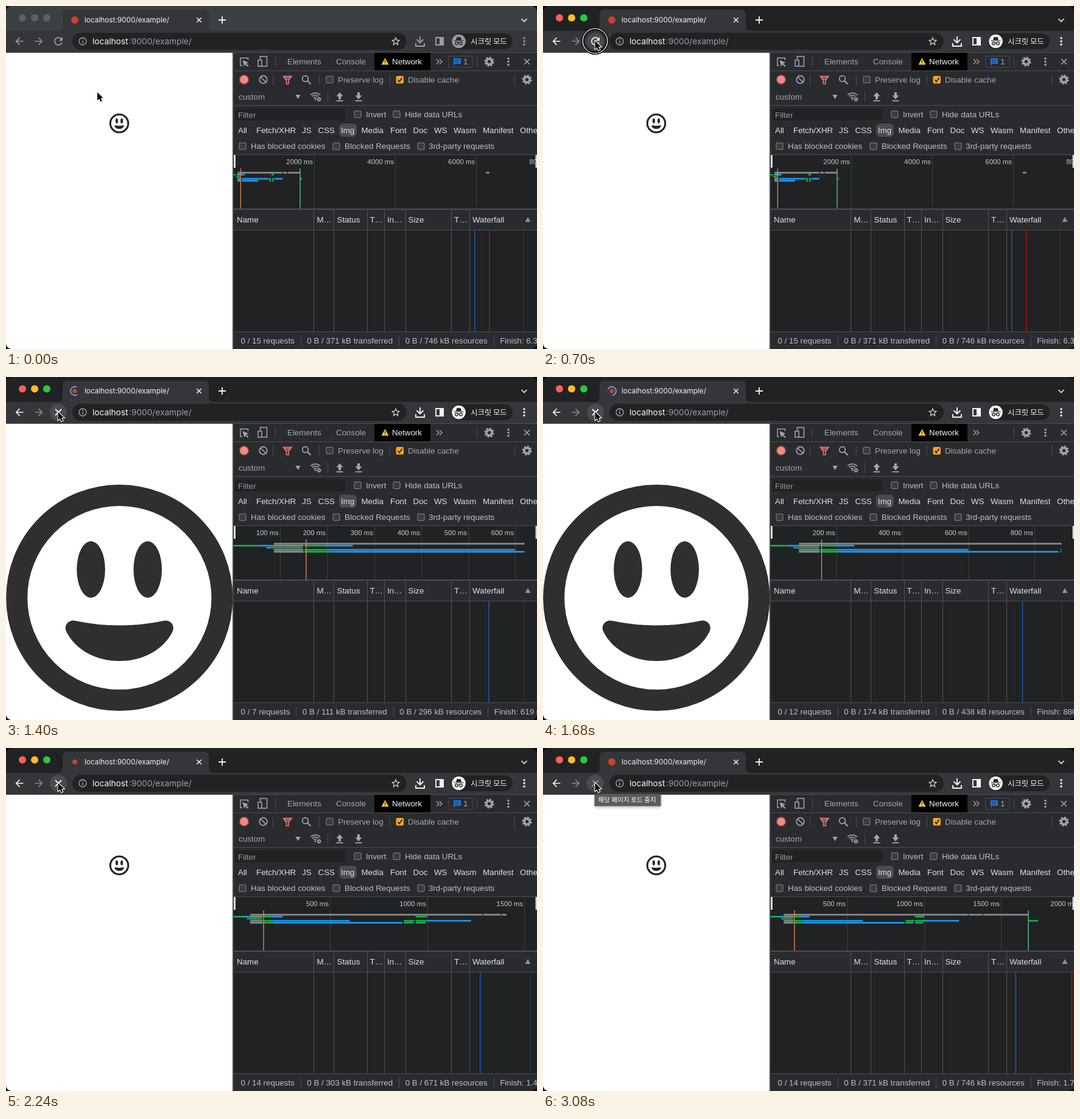
These frames come from a looping animation (872x564 px, 3360 ms). An HTML page with a canvas:

```html
<!DOCTYPE html>
<html lang="ko">
<head>
<meta charset="utf-8">
<title>Page reload</title>
<style>
html, body { margin: 0; width: 100%; height: 100%; overflow: hidden; background: #000; }
canvas { display: block; }
</style>
</head>
<body>
<canvas id="stage" width="872" height="564"></canvas>
<script>
const ctx = document.getElementById('stage').getContext('2d');
const LOOP = 3360, STEP = 70, LEFT = 373.5, WIDTH = 498;
const SANS = '"Liberation Sans", Arial, sans-serif';
const UI = 'Inter, sans-serif';
const KOREAN = '"Noto Sans CJK KR", "Noto Sans CJK", sans-serif';
const BAR = '#292b2e', BODY = '#202224', EDGE = '#4b4d51', DIM = '#a3a8ad', SOFT = '#bcc0c4', LIGHT = '#dfe1e5';

// ---- drawing helpers
function rect(x, y, w, h, c, r = 0) {
  ctx.fillStyle = c;
  ctx.beginPath();
  ctx.roundRect(x, y, w, h, r);
  ctx.fill();
}
function dot(x, y, r, c) {
  ctx.fillStyle = c;
  ctx.beginPath();
  ctx.arc(x, y, r, 0, 7);
  ctx.fill();
}
function ring(x, y, r, c, w = 1.5, from = 0, to = 2 * Math.PI) {
  ctx.strokeStyle = c;
  ctx.lineWidth = w;
  ctx.beginPath();
  ctx.arc(x, y, r, from, to);
  ctx.stroke();
}
function fill(d, c) {
  ctx.fillStyle = c;
  ctx.fill(new Path2D(d));
}
function line(d, c, w = 1.5) {
  ctx.strokeStyle = c;
  ctx.lineWidth = w;
  ctx.stroke(new Path2D(d));
}
function moved(x, y, scale, draw) {
  ctx.save();
  ctx.translate(x, y);
  ctx.scale(scale, scale);
  draw();
  ctx.restore();
}
// path on a 24 px grid, centred on x, y
function icon(d, x, y, scale, c) {
  moved(x, y, scale, () => { ctx.translate(-12, -12); fill(d, c); });
}
function text(s, x, y, c = SOFT, size = 13.35, font = SANS, weight = 400) {
  ctx.font = `${weight} ${size}px ${font}`;
  ctx.fillStyle = c;
  ctx.fillText(s, x, y);
}
const cross = (x, y, r, c, w) => line(`M${x - r} ${y - r}l${2 * r} ${2 * r}m0 ${-2 * r}l${-2 * r} ${2 * r}`, c, w);
const vline = (x, y, h, c = EDGE, w = 1) => rect(x, y, w, h, c);
const kebab = (x, y, c, gap) => [-gap, 0, gap].forEach(d => dot(x, y + d, 1.7, c));
const checkbox = (x, y) => {
  rect(x, y, 12, 12, '#85888c', 2.5);
  rect(x + 1, y + 1, 10, 10, '#3b3b3d', 1.5);
};
function gear(x, y, c, s = 1) {
  ring(x, y, 4.4 * s, c, 3.2 * s);
  ctx.setLineDash([3.2 * s, 2.06 * s]);
  ring(x, y, 6.7 * s, c, 2.6 * s);
  ctx.setLineDash([]);
}

const ICON = {
  back: 'M20 11H7.83l5.59-5.59L12 4l-8 8 8 8 1.41-1.41L7.83 13H20z',
  forward: 'M12 4l-1.41 1.41L16.17 11H4v2h12.17l-5.58 5.59L12 20l8-8z',
  reload: 'M17.65 6.35C16.2 4.9 14.21 4 12 4c-4.42 0-8 3.58-8 8s3.58 8 8 8c3.73 0 6.84-2.55 7.73-6h-2.08c-.82 2.33-3.04 4-5.65 4-3.31 0-6-2.69-6-6s2.69-6 6-6c1.66 0 3.14.69 4.22 1.78L13 11h7V4z',
  star: 'M22 9.24l-7.19-.62L12 2 9.19 8.63 2 9.24l5.46 4.73L5.82 21 12 17.27 18.18 21l-1.63-7.03zM12 15.4l-3.76 2.27 1-4.28-3.32-2.88 4.38-.38L12 6.1l1.71 4.04 4.38.38-3.32 2.88 1 4.28z',
};

// ---- network data: [row, start ms, colour of each part, end ms of each part]
const COLORS = { g: '#16ad47', b: '#1c95ec', x: '#8b8b8b' };
const OLD_BARS = [
  [0, 98, 'x', 1205], [0, 1225, 'x', 1320], [0, 1340, 'x', 1647], [0, 6230, 'x', 6320],
  [1, 0, 'g', 50], [1, 75, 'gxb', 110, 188, 278], [1, 940, 'g', 1000], [2, 68, 'g', 158],
  [3, 98, 'x', 188], [3, 210, 'b', 870], [3, 880, 'g', 930], [3, 955, 'g', 1000],
  [3, 1015, 'b', 1210], [3, 1650, 'g', 1690],
  [4, 98, 'x', 188], [4, 205, 'b', 609], [4, 880, 'g', 925], [4, 955, 'g', 995],
];
const BARS = [
  [0, 86, 'x', 1282], [0, 1286, 'x', 1377], [0, 1381, 'x', 1670],
  [1, 0, 'gbx', 52, 86, 149], [1, 151, 'gb', 195, 254], [1, 938, 'g', 998],
  [2, 70, 'bg', 77, 147],
  [3, 86, 'x', 149], [3, 151, 'gb', 201, 599], [3, 877, 'g', 932], [3, 938, 'gb', 998, 1224], [3, 1674, 'g', 1737],
  [4, 86, 'x', 149], [4, 151, 'gb', 209, 871], [4, 877, 'g', 928], [4, 938, 'g', 990],
];
const OLD = { now: 6320, span: 7489, grid: 7489, blue: 769, gray: 849, kb: 371, res: 746,
  dom: 173, load: 1640, red: 793, requests: 15, bars: OLD_BARS };
// time, elapsed, bar span, ruler span, DOM marker x, guide x, kB moved, kB in all
const KEYS = [
  [770, 0, 70, 70, 862, 800, 0, 0],
  [1050, 284, 329, 263, 823, 839, 27, 81.6],
  [1400, 619, 645, 645, 792, 850, 111, 296],
  [2030, 1207, 1257, 1257, 780, 854, 252, 615],
  [2520, 1672, 1968, 1968, 775.5, 871, 370, 746],
  [2590, 1740, 1968, 1968, 775.5, 871, 371, 746],
];
function network(t) {
  if (t < 770) return OLD;
  const i = Math.max(1, KEYS.findIndex(k => k[0] >= t));
  const last = t > 2590;
  const a = KEYS[last ? 5 : i - 1], b = KEYS[last ? 5 : i];
  const p = last ? 0 : (t - a[0]) / (b[0] - a[0]);
  const [, now, span, grid, blue, gray, kb, res] = a.map((v, n) => v + (b[n] - v) * p);
  const requests = now < 52 ? 1 : now < 86 ? 3 : now < 870 ? 7 : now < 1240 ? 12 : 14;
  return { now, span, grid, blue, gray, kb, res, dom: 154, load: 1672, red: 867.5, requests, bars: BARS };
}

// ---- parts of the picture
function browser(t, active) {
  const on = active ? '#f1f3f4' : '#9a9c9f', off = active ? '#85888c' : '#8b8d90';
  rect(0, 0, 872, 42, active ? BODY : '#3c4043');
  rect(0, 41, 872, 36, '#35363a');
  fill('M85 41Q93 41 93 33V14Q93 6 101 6H325Q333 6 333 14V33Q333 41 341 41Z', '#35363a');
  ['#ff5f57', '#febc2e', '#28c840'].forEach((c, i) => dot(27 + 20 * i, 19.6, 6, active ? c : '#5d5f62'));

  const waiting = t >= 840 && t < 1980;
  dot(113, 23, waiting ? 3.5 : t >= 1980 && t < 2380 ? 4 : t >= 2380 && t < 2600 ? 5 : 6, '#cf3f2c');
  if (waiting) {
    const turn = (t - 1400) * .009;
    ring(113, 23, 7, t < 1120 ? '#7f8c9a' : '#6fa5e2', 1.8, 1 + turn, 5.2 + turn);
  }
  text('localhost:9000/example/', 129, 27, '#f1f3f4', 11.8, UI);
  cross(317, 23, 3.8, '#e8eaed', 1.6);
  line('M349 23h12m-6-6v12', '#f1f3f4', 1.8);
  line('M846.5 21l4.5 4.5 4.5-4.5', '#e8eaed', 1.7);

  icon(ICON.back, 22, 58, .8, on);
  icon(ICON.forward, 54, 58, .8, off);
  if (active) dot(86, 58, 14, '#4a4b4f');
  if (t < 1120) icon(ICON.reload, 86, 58, .86, on);
  else cross(86, 58, 5, t < 2450 ? '#f1f3f4' : '#85888c', 1.8);

  rect(109, 44, 549, 28, BODY, 14);
  ring(126, 58, 6, '#a4a8ac', 1.3);
  line('M126 57v4.5M126 54.2v1.6', '#a4a8ac', 1.5);
  text('localhost', 142, 63, '#f8f9fa', 13.7, UI);
  text(':9000/example/', 202, 63, '#9aa0a6', 13.7, UI);
  icon(ICON.star, 640, 58, .74, '#d6d8db');
  line('M680 50v10M674.5 55l5.5 5.5 5.5-5.5M673 61v5h14v-5', on, 1.9);
  line('M706 52h12v12h-12z', on, 1.9);
  rect(712, 51, 7, 14, on);
  rect(731, 45, 101, 26, BODY, 13);
  dot(743.5, 58, 11.3, on);
  fill('M739 56l1.3-4.5q.3-1 1.3-.6l1.9.5 1.9-.5q1-.4 1.3.6l1.3 4.5zM735.5 56.4h16v1.2h-16z', BODY);
  ring(740, 61.5, 2.3, BODY, 1.3);
  ring(747, 61.5, 2.3, BODY, 1.3);
  line('M742 61q1.5-.8 3 0', BODY, 1.1);
  text('시크릿 모드', 763, 62.5, '#f1f3f4', 12.4, KOREAN, active ? 500 : 400);
  kebab(851, 58, on, 5.3);
  rect(0, 76, 872, 1, '#4c4d50');
}

function face(big) {
  rect(0, 77, 372, 487, '#fff');
  moved(big ? 186.3 : 186, big ? 363 : 193, big ? 1 : .0875, () => {
    const c = big ? '#312e2f' : '#262324';
    ring(0, 0, 168.6, c, 35);
    ctx.beginPath();
    for (const x of [-46.8, 46.4]) ctx.ellipse(x, -46.5, 23.3, 46.5, 0, 0, 7);
    ctx.fillStyle = c;
    ctx.fill();
    fill('M-72 38Q0 53 72 38C84 35 92 46 87 56C72 86 38 104 0 104C-38 104-72 86-87 56C-92 46-84 35-72 38Z', c);
  });
}

function toolbars(badge) {
  rect(372, 77, 2, 487, '#46484b');
  rect(374, 77, 498, 487, BAR);
  // panel tabs
  line('M388 98h-3v-12.5h12.5v3.5', DIM, 1.4);
  fill('M388.5 89l10 4-4 1.6 4 4-1.5 1.5-4-4-1.6 3.6z', DIM);
  line('M417.5 88v-5h11v16h-8M414 89h6v10h-6z', DIM, 1.5);
  vline(442, 83, 17);
  text('Elements', 462, 96, DIM);
  text('Console', 542, 96, DIM);
  rect(605, 77, 92, 29, '#000');
  fill('M622.5 85.5l6 11h-12z', '#fcc934');
  line('M622.5 89v4M622.5 94v1.3', '#3a3000', 1.3);
  text('Network', 634, 96, '#f4f4f4');
  line('M707 87.5l4 4-4 4m5-8l4 4-4 4', DIM, 1.3);
  if (badge) {
    rect(726.5, 82, 40, 19.5, EDGE, 2);
    rect(727.5, 83, 38, 17.5, BAR, 1.5);
    fill('M735 86h12v9h-9l-3 3z', '#1a73e8');
    line('M737 89h8m-8 3h6', BAR, 1);
    text('1', 751, 96, DIM);
  }
  vline(773, 83, 17);
  gear(793.5, 91.5, DIM);
  kebab(825, 91.5, DIM, 5);
  cross(855.5, 91.5, 4.5, DIM, 1.6);
  rect(374, 106, 498, 1, EDGE);

  // recording controls
  dot(391, 121, 8.5, '#6b3b3a');
  dot(391, 121, 6.8, '#f28b82');
  ring(422.5, 121, 6.3, DIM, 1.7);
  line('M418 116.5l9 9', DIM, 1.7);
  vline(438, 113, 17);
  line('M455.5 115.5h13.5l-5 6.5v6h-3.5v-6z', '#f07b72', 1.6);
  line('M457 117.5h10l-2 3h-6z', '#f07b72', 1.5);
  ring(491.5, 119.5, 4.8, DIM, 1.7);
  line('M495 123l5.5 5.5', DIM, 2);
  vline(514, 113, 17);
  checkbox(525.5, 115);
  text('Preserve log', 545, 126, DIM);
  vline(630, 113, 17);
  rect(640.5, 115, 12.5, 12.5, '#fca326', 2.5);
  line('M643.5 121.5l2.5 3 4.5-6.5', '#202124', 1.9);
  text('Disable cache', 660, 126, DIM);
  vline(835, 113, 17);
  gear(855.5, 121, DIM);

  text('custom', 382, 154, DIM);
  fill('M475.5 146h8l-4 7z', DIM);
  for (const r of [4, 7.5, 11]) ring(508, 154, r, DIM, 1.6, -2.35, -.75);
  dot(508, 153, 1.5, DIM);
  dot(514, 153.5, 4.6, BAR);
  gear(514, 153.5, DIM, .45);
  vline(528, 141, 17);
  fill('M548 142l5.5 6.5h-3.5v5h-4v-5h-3.5z', DIM);
  fill('M579 153.5l5.5-6.5h-3.5v-5h-4v5h-3.5z', DIM);
  rect(542.5, 155, 11, 1.8, DIM);
  rect(573.5, 155, 11, 1.8, DIM);
  rect(374, 163, 498, 1, EDGE);

  // filters
  rect(376, 168, 181, 20, BODY);
  text('Filter', 381, 184, '#96999d');
  checkbox(571.5, 172);
  text('Invert', 591, 183);
  checkbox(635.5, 172);
  text('Hide data URLs', 655, 183);
  rect(547, 193.5, 29, 21.5, '#4a4b4e', 6);
  const types = { All: 381, 'Fetch/XHR': 411, JS: 486, CSS: 512.5, Img: 550, Media: 583.5, Font: 631,
    Doc: 668.5, WS: 703, Wasm: 735, Manifest: 783, Other: 844 };
  for (const name in types) text(name, types[name], 209, LIGHT);
  checkbox(382.5, 224.5);
  text('Has blocked cookies', 402, 235);
  checkbox(536.5, 224.5);
  text('Blocked Requests', 556, 235);
  checkbox(675.5, 224.5);
  text('3rd-party requests', 694, 235);
  rect(374, 244, 498, 1, EDGE);
}

function overview(net) {
  rect(374, 245, 498, 88, BODY);
  const gridScale = WIDTH / net.grid, scale = WIDTH / net.span;
  let step = 1;
  for (let i = 0; step * gridScale < 70; i++) step *= [2, 2.5, 2][i % 3];
  ctx.textAlign = 'right';
  for (let ms = step; ms < net.grid + step; ms += step) {
    const x = Math.round(LEFT + ms * gridScale - .6);
    vline(x, 245, 88, '#3b3d40');
    text(ms + ' ms', x - 2, 260, '#c6c9cd', 11.4);
  }
  ctx.textAlign = 'left';
  for (const [row, start, kinds, ...ends] of net.bars) {
    let from = start;
    ends.forEach((end, i) => {
      const to = Math.min(end, net.now);
      if (to > from) rect(LEFT + from * scale, 272.7 + 3.35 * row, (to - from) * scale, 2.7, COLORS[kinds[i]]);
      from = end;
    });
  }
  if (net.now >= net.dom) vline(LEFT + net.dom * scale - .3, 267, 66, '#df8250', 1.4);
  if (net.now >= net.load) vline(LEFT + net.load * scale - .3, 267, 66, '#4fbf98', 1.4);
  vline(374, 245, 21, '#d5d7da', 3);
  vline(869.5, 245, 21, '#d5d7da', 3);
}

function table(net) {
  rect(374, 333, 498, 2, EDGE);
  rect(374, 335, 498, 33, BAR);
  rect(374, 368, 498, 167, BODY);
  rect(374, 368, 498, 1, EDGE);
  vline(Math.round(net.gray), 369, 166, '#35373a');
  for (const x of [505, 538, 593, 621, 656, 731, 761]) vline(x, 335, 200, '#505256');
  const heads = [['Name', 379], ['M…', 510.5], ['Status', 543.5], ['T…', 597.5], ['In…', 626], ['Size', 660.5],
    ['T…', 736], ['Waterfall', 766]];
  for (const [name, x] of heads) text(name, x, 356, LIGHT);
  fill('M857 347l4.5 8h-9z', '#8e9195');
  if (net.now >= net.dom) vline(net.blue, 369, 166, '#1a56a4', 1.6);
  if (net.now >= net.load + 60) vline(net.red, 369, 166, '#9c1712', 1.6);

  rect(374, 535, 498, 1, EDGE);
  rect(374, 536, 498, 28, BAR);
  const size = v => (v < 100 ? v.toFixed(1) : Math.round(v)) + ' kB';
  const finish = net.now < 1000 ? Math.round(net.now) + ' ms' : (net.now / 1000).toFixed(2) + ' s';
  const parts = [`0 / ${net.requests} requests`, `0 B / ${size(net.kb)} transferred`,
    `0 B / ${size(net.res)} resources`, 'Finish: ' + finish];
  let x = 385.5;
  parts.forEach((part, i) => {
    text(part, x, 555);
    x += ctx.measureText(part).width + 10;
    if (i < 3) vline(Math.round(x), 542, 17);
    x += 10.5;
  });
}

function tooltip(s, width, alpha) {
  ctx.save();
  ctx.globalAlpha = alpha;
  ctx.shadowColor = 'rgba(0,0,0,.35)';
  ctx.shadowBlur = 5;
  ctx.shadowOffsetY = 1.5;
  rect(84.5, 75.5, width, 20, '#5b5b5c');
  ctx.shadowColor = 'transparent';
  text(s, 90.5, 89, '#fff', 10.65, KOREAN, 500);
  ctx.restore();
}

function pointer(t) {
  const p = Math.min(t / 560, 1), e = p * p * (3 - 2 * p);
  if (t >= 630 && t < 770) {
    ring(85.5, 57.5, 20, '#111', 5);
    ring(85.5, 57.5, 20.3, '#eee', 1.3);
  }
  moved(150 - 64.4 * e, 142 - 84.5 * e, .93, () => {
    const d = 'M0 0v14.2l3.3-3 2.3 5.3 2.6-1.1-2.3-5.2h4.4z';
    line(d, '#fff', 2.2);
    fill(d, '#000');
  });
}

function draw(t) {
  const active = t >= 630;
  const net = network(t);
  ctx.fillStyle = '#000';
  ctx.fillRect(0, 0, 872, 564);
  ctx.save();
  ctx.beginPath();
  ctx.roundRect(0, 0, 872, 564, 9);
  ctx.clip();
  browser(t, active);
  face(t >= 910 && t < 2170);
  toolbars(t < 770 || t >= 2240);
  overview(net);
  table(net);
  if (t >= 2380 && t < 2800) tooltip('옵션을 더 보려면 이 페이지를 새로고친 다음 누르기', 236, t < 2730 ? 1 : .5);
  if (t >= 3080) tooltip('해당 페이지 로드 중지', 109, 1);
  pointer(t);
  ctx.restore();
}

const begin = performance.now();
function tick() {
  const t = (performance.now() - begin) % LOOP;
  draw(Math.floor(t / STEP) * STEP);
  requestAnimationFrame(tick);
}
tick();
</script>
</body>
</html>
```
